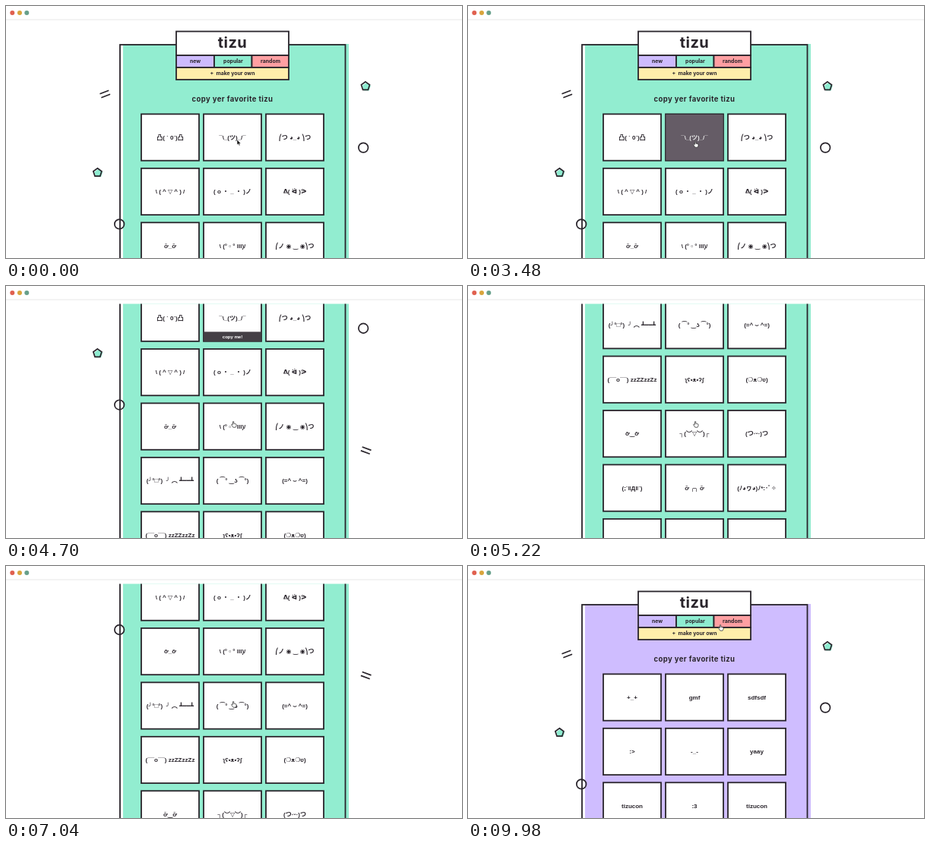
Write an HTML page that moves like this. It is 600 by 332 pixels and loops after 10000 ms.

```html
<!DOCTYPE html>
<html lang="en">
<head>
<meta charset="utf-8">
<style>
html, body { margin: 0; width: 100%; height: 100%; overflow: hidden; background: #fff; }
svg { display: block; width: 600px; height: 332px; }
text { font: 700 6.9px Inter, "Open Sans", sans-serif; fill: #29242b; text-anchor: middle; white-space: pre; }
.face { font: bold 8px "Liberation Sans", "DejaVu Sans", "Noto Sans CJK JP", sans-serif; }
.bar { font: bold 6.2px "Liberation Sans", Arial, sans-serif; fill: #fff; letter-spacing: -.1px; }
.line { fill: none; stroke: #29242b; stroke-width: 1.7; }
</style>
</head>
<body>
<svg viewBox="0 0 600 332">
  <clipPath id="view"><rect y="23.5" width="600" height="309"/></clipPath>
  <g clip-path="url(#view)"><g id="page"></g></g>
  <path d="M0 18H600" stroke="#e8e8e8"/>
  <circle cx="8.3" cy="9" r="3" fill="#e0604f"/>
  <circle cx="18" cy="9" r="3" fill="#d9a53c"/>
  <circle cx="27.3" cy="9" r="3" fill="#67a08b"/>
  <g id="cursor" stroke-width=".7" stroke-linejoin="round"></g>
</svg>
<script>
const LOOP = 10000, TOP = 142.4, PITCH = 71.45, CARD_W = 76, CARD_H = 61.3;
const MINT = [146, 237, 208], LILAC = [207, 189, 255];
const $ = id => document.getElementById(id);
const clamp = v => Math.max(0, Math.min(1, v));
const ramp = (t, start, length) => clamp((t - start) / length);

const popular = String.raw`
凸( ˋ 0´)凸|¯\_(ツ)_/¯|⎛つ ◕_◕ ⎞つ
\ ( ^ ▽ ^ ) /|( o ・ _ ・ )ノ|ᕕ( ᐛ )ᕗ
ơ̄_ơ̄|\ (° ▫ ° lll)/|⎛ノ ◉ ‿ ◉⎞つ
(╯°□°)  ╯ ︵ ┻━━┻|( ⁀° ‿ʖ ⁀°)|(=^ ⌣ ^=)
(¯¯o¯¯) zzZZzzZz|ʅʕ•ᴥ•ʔʃ|(❍ᴥ❍ʋ)
ơ̄‿ơ̄|┐(︶▽︶)┌|(つ·ᵕ·)つ
(;´‖Д‖ˋ)|ơ̄ ╭╮ ơ̄|(ﾉ◕ヮ◕)ﾉ*:･ﾟ✧
<(¯¯︶¯¯)>|¯\_( '-')_/¯|(o˘◡˘o)
(十 ơ̄益ơ̄)|<ᕙ(⇀‸↼‶)ᕗ>|/ = ◑ ‿ ◑ = \
`.trim().split("\n").flatMap(row => row.split("|"));
const fresh = ["+_+", "gmf", "sdfsdf", ":>", "-_-", "yaay", "tizucon", ":3", "tizucon"];

// [time, ...values] keyframes, joined by straight moves; the scroll ends in a slight overshoot
const scroll = [[3800, 0], [4150, 22], [4700, 130.5], [4900, 205], [5150, 330], [5400, 350],
  [5700, 425], [6000, 473], [6250, 473], [6500, 385], [6820, 256], [7040, 203.7], [7400, 90],
  [7650, 20], [7840, -.6], [8140, -.6], [8600, 0]];
const pointer = [[720, 304, 178], [1000, 300, 182], [7860, 300, 182], [8140, 279, 119],
  [8450, 250, 75], [9200, 250, 75], [9960, 333, 81]];
// [row, start, end]
const hovers = [[0, 900, 5050], [5, 5200, 6300], [0, 7760, 8110]];
const shapes = {
  arrow: '<path d="M0-2V5L1.6 3.6 2.8 6 4 5.4 2.9 3.2H5Z" fill="#111" stroke="#fff" stroke-width=".5"/>',
  hand: '<path d="M-1.6.6V-3.2q.7-1 1.4 0V-.8q2 .1 3.2 1v2L2 4.2H-1.2L-3.4.8q0-1 1-.7Z" fill="#fff" stroke="#222"/>',
  beam: '<path d="M-1.5-4Q0-4 0-3 0-4 1.5-4M0-3V3M-1.5 4Q0 4 0 3 0 4 1.5 4M-1 1H1" fill="none" stroke="#222"/>'
};

function at(keys, t) {
  const i = keys.findIndex(k => k[0] > t);
  if (i < 0) return keys.at(-1).slice(1);
  if (!i) return keys[0].slice(1);
  const a = keys[i - 1], b = keys[i], p = (t - a[0]) / (b[0] - a[0]);
  return a.slice(1).map((v, n) => v + (b[n + 1] - v) * p);
}

const esc = s => s.replace(/</g, "&lt;").replace(/>/g, "&gt;");
const label = (x, y, s, attrs = "") => `<text x="${x}" y="${y}" ${attrs}>${esc(s)}</text>`;
const rect = (x, y, w, h, fill, attrs = "") =>
  `<rect x="${x}" y="${y}" width="${w}" height="${h}" fill="${fill}" ${attrs}/>`;
const ring = (x, y) => `<circle class="line" cx="${x}" cy="${y}" r="6.3"/>`;
const dashes = (x, y, angle) =>
  `<path class="line" transform="translate(${x} ${y}) rotate(${angle})" d="M-6.3-2.6H6.3M-6.3 2.6H6.3"/>`;

function pentagon(x, y) {
  const points = [0, 1, 2, 3, 4].map(i => {
    const a = i * Math.PI * .4 - Math.PI / 2;
    return [5.8 * Math.cos(a), 5.8 * Math.sin(a)].map(v => v.toFixed(2));
  }).join(" ");
  return `<g transform="translate(${x} ${y})"><polygon points="${points}" fill="#8eecd0" transform="translate(1.3 1)"/>
    <polygon class="line" points="${points}"/></g>`;
}

const edge = 'stroke="#29242b" stroke-width="1.8"';

function card(i) {
  const x = 178 + i % 3 * 82, y = TOP + Math.floor(i / 3) * PITCH;
  return `<g transform="translate(${x} ${y})">` +
    rect(0, 0, CARD_W, CARD_H, "#fff", edge) +
    (i == 1 ? rect(.5, .5, CARD_W - 1, CARD_H - 1, "#655c66", 'id="flash"') : "") +
    label(CARD_W / 2, 33.3, popular[i] || "", 'class="face"') + "</g>";
}

$("page").innerHTML =
  rect(154, 50, 297, 900, "", 'id="panel"') +
  rect(150, 51, 296.5, 900, "none", edge) +
  rect(224, 33.5, 148, 31.5, "#fff", edge) +
  rect(224, 65, 50, 16, "#cdbbfd", edge) +
  rect(274, 65, 49.5, 16, "#8eecd0", edge) +
  rect(323.5, 65, 48.5, 16, "#ff9fa2", edge) +
  rect(224, 81, 148, 16, "#ffeeab", edge) +
  label(298, 55, "tizu", 'style="font-size:20px;letter-spacing:.5px"') +
  label(249, 75.2, "new") + label(299, 75.2, "popular") + label(348, 75.2, "random") +
  label(298, 91.2, "+  make your own") +
  label(298, 126.4, "copy yer favorite tizu", 'style="font-size:9.5px;letter-spacing:.4px"') +
  Array.from({ length: 33 }, (_, i) => card(i)).join("") +
  `<g id="bar">${rect(260.5, 0, 75, 12.5, "#443f45")}${label(298, 8.8, "copy me!", 'class="bar"')}</g>` +
  dashes(130.3, 116, -21) + dashes(473.7, 347.5, 20) +
  pentagon(473, 105.7) + pentagon(120.4, 219.5) + ring(470.2, 186.6) + ring(149.2, 287.4);

const faces = [...document.querySelectorAll(".face")];
const bar = $("bar"), barBox = bar.firstChild, barText = bar.lastChild;
let shownList, shownCursor;

function draw(t) {
  $("page").setAttribute("transform", `translate(0 ${-at(scroll, t)[0]})`);

  const mix = ramp(t, 9030, 120);
  $("panel").setAttribute("fill", `rgb(${MINT.map((v, i) => Math.round(v + (LILAC[i] - v) * mix))})`);
  const list = t < 9060 ? popular : fresh;
  if (list != shownList) faces.forEach((f, i) => f.textContent = list[i] || "");
  shownList = list;

  const flash = Math.min(ramp(t, 3250, 120), 1 - ramp(t, 3520, 200));
  $("flash").setAttribute("opacity", flash);
  faces[1].style.fill = flash > .5 ? "#eee" : "";

  const hover = hovers.find(h => t >= h[1] && t < h[2] + 180);
  const rise = hover && flash < .5 ? Math.min(ramp(t, hover[1], 180), 1 - ramp(t, hover[2], 180)) : 0;
  bar.setAttribute("visibility", rise ? "visible" : "hidden");
  if (rise) {
    const bottom = TOP + hover[0] * PITCH + CARD_H;
    bar.setAttribute("transform", `translate(0 ${bottom - 12.5 * rise})`);
    barBox.setAttribute("height", 12.5 * rise);
    barText.setAttribute("opacity", rise);
  }

  const kind = t < 800 ? "arrow" : t > 8070 && t < 8240 ? "beam" : "hand";
  if (kind != shownCursor) $("cursor").innerHTML = shapes[kind];
  shownCursor = kind;
  $("cursor").setAttribute("transform", `translate(${at(pointer, t)})`);
}

const begin = performance.now();
function tick() {
  draw((performance.now() - begin) % LOOP);
  requestAnimationFrame(tick);
}
tick();
</script>
</body>
</html>
```
